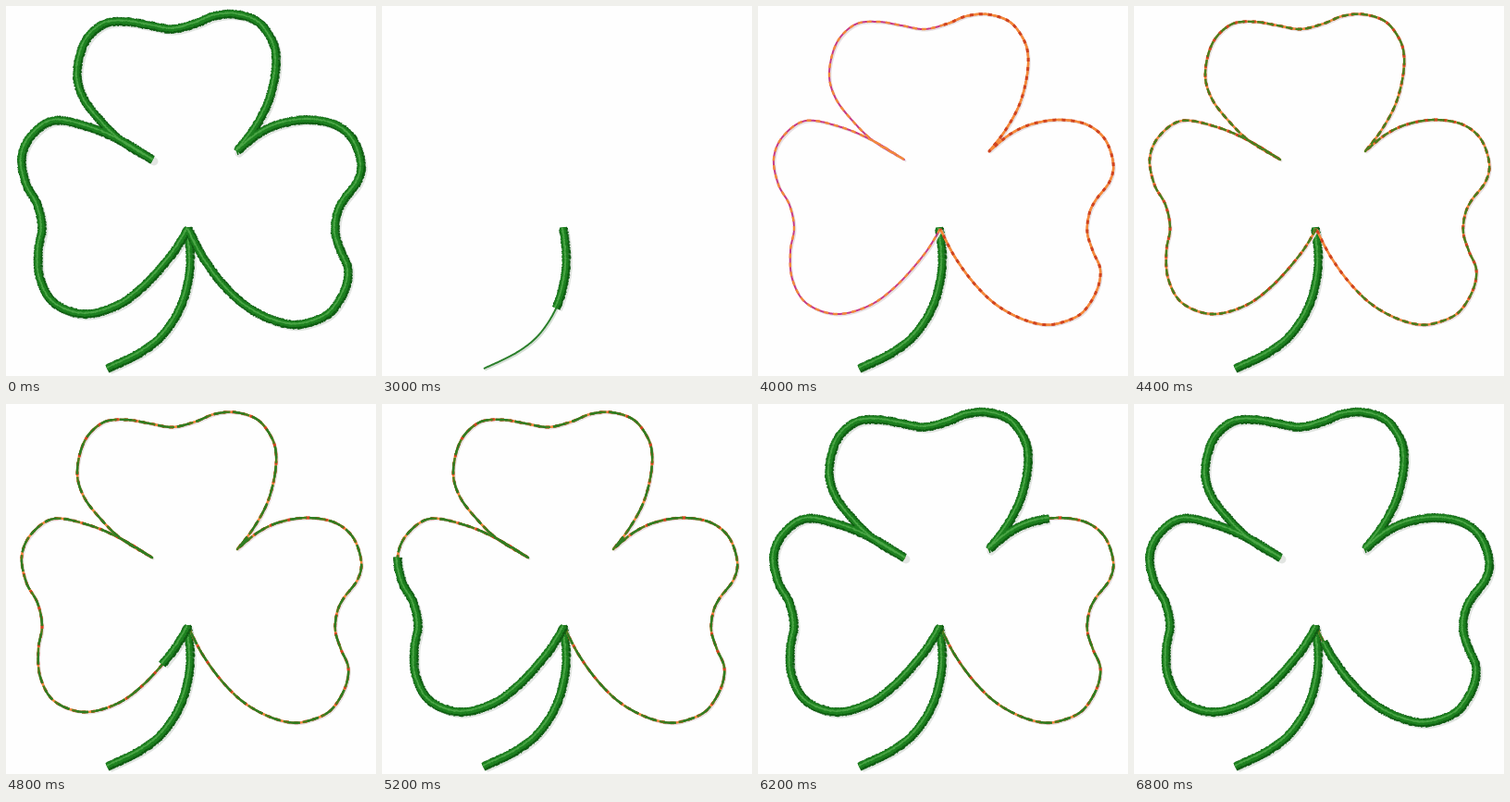
An HTML page with a canvas for the animation above (7000 ms loop, 400 by 400 pixels).

```html
<!DOCTYPE html>
<html lang="en">
<head>
<meta charset="utf-8">
<title>Shamrock embroidery</title>
<style>
  html, body { margin: 0; width: 100%; height: 100%; overflow: hidden; background: #fefefe; }
  canvas { display: block; }
</style>
</head>
<body>
<canvas id="stage" width="400" height="400"></canvas>
<script>
const ctx = document.getElementById('stage').getContext('2d');
const LOOP = 7000, STEP = 200;

// Smooth curve through the knots, resampled to one point per pixel of length.
function curve(text) {
  const knots = text.split(' ').map(p => p.split(',').map(Number));
  const at = i => knots[Math.max(0, Math.min(knots.length - 1, i))];
  const out = [knots[0]];
  let last = knots[0];
  for (let i = 0; i < knots.length - 1; i++) {
    const [a, b, c, d] = [at(i - 1), at(i), at(i + 1), at(i + 2)];
    for (let s = 1; s <= 200; s++) {
      const t = s / 200;
      const p = [0, 1].map(k => b[k] + 0.5 * t * (c[k] - a[k]
        + t * (2 * a[k] - 5 * b[k] + 4 * c[k] - d[k]
        + t * (3 * (b[k] - c[k]) + d[k] - a[k]))));
      if (Math.hypot(p[0] - last[0], p[1] - last[1]) >= 1) out.push(last = p);
    }
  }
  return out;
}

const stem = curve('196,240 199,265 198,292 189,325 170,355 145,375 110,392');
const leftLeaf = curve('197,241 180,268 150,302 120,324 84,333 52,321 37,295 35,265 39,240 34,215 22,193 17,165 27,141 52,124 90,131 125,146 158,166');
const topLeaf = curve('158,166 125,146 103,125 84,100 77,73 85,40 105,20 130,17 155,21 180,25 205,19 225,11 248,9 272,17 287,36 292,55 290,80 282,108 267,135 250,157');
const rightLeaf = curve('250,157 272,139 295,128 325,123 355,128 375,144 384,170 380,190 365,210 358,225 356,245 362,265 370,285 366,308 350,332 325,343 305,344 280,336 255,321 232,298 212,270 197,241');
const outline = [...leftLeaf, ...topLeaf, ...rightLeaf];
const total = outline.length;

const nearest = (pts, x, y) => pts.reduce((best, p, i) =>
  Math.hypot(p[0] - x, p[1] - y) < Math.hypot(pts[best][0] - x, pts[best][1] - y) ? i : best, 0);
const leftSide = nearest(outline, 17, 165);
const topMiddle = nearest(outline, 201, 21);

const noise = n => {
  const v = Math.sin(n * 127.1) * 43758.5453;
  return v - Math.floor(v);
};

// Linear interpolation through [time, value] keys, held at both ends.
function track(time, keys) {
  if (time <= keys[0][0]) return keys[0][1];
  for (let i = 1; i < keys.length; i++) {
    const [t0, v0] = keys[i - 1], [t1, v1] = keys[i];
    if (time <= t1) return v0 + (v1 - v0) * (time - t0) / (t1 - t0);
  }
  return keys[keys.length - 1][1];
}

function thread(pts, from, to, color, width, dash = [], shift = 0) {
  const part = pts.slice(Math.round(from), Math.round(to));
  if (part.length < 2) return;
  ctx.beginPath();
  part.forEach(([x, y]) => ctx.lineTo(x + shift, y + shift));
  ctx.setLineDash(dash);
  ctx.strokeStyle = color;
  ctx.lineWidth = width;
  ctx.lineJoin = 'round';
  ctx.stroke();
  ctx.setLineDash([]);
}

const layers = [
  { color: '#0f5c12', half: 4.4, rough: 1.1, lift: 0 },
  { color: '#1d801f', half: 3, rough: 1.2, lift: 0.8 },
  { color: '#4aa545', half: 0.7, rough: 0.9, lift: 1.2 }
];

// Dense cross stitches, lit from the upper left.
function satin(pts, to) {
  const end = Math.min(Math.round(to), pts.length);
  if (end < 2) return;
  layers.forEach(({ color, half, rough, lift }, layer) => {
    ctx.beginPath();
    for (let i = 0; i < end; i++) {
      const [x, y] = pts[i];
      const a = pts[Math.max(0, i - 2)], b = pts[Math.min(pts.length - 1, i + 2)];
      const len = Math.hypot(b[0] - a[0], b[1] - a[1]) || 1;
      const nx = (a[1] - b[1]) / len, ny = (b[0] - a[0]) / len;
      const offset = -(nx + ny) * lift;
      const h1 = offset + half + rough * (noise(i + layer * 31) - 0.3);
      const h2 = offset - half - rough * (noise(i + layer * 57 + 900) - 0.3);
      ctx.moveTo(x + nx * h1, y + ny * h1);
      ctx.lineTo(x + nx * h2, y + ny * h2);
    }
    ctx.strokeStyle = color;
    ctx.lineWidth = 1.4;
    ctx.stroke();
  });
}

function draw(time) {
  const finished = time < 3000;
  const grow = (start, end) => track(time, [[start, 0], [end, total]]);
  const stemEnd = finished || time >= 3200 ? stem.length : nearest(stem, 188, 327);
  const satinEnd = finished ? total : track(time,
    [[4736, 0], [5200, leftSide], [5800, topMiddle], [6800, total - 17]]);

  ctx.fillStyle = '#fefefe';
  ctx.fillRect(0, 0, 400, 400);

  thread(stem, 0, stemEnd, '#e2e5e2', 9, [], 2);
  thread(outline, 0, satinEnd, '#e2e5e2', 9, [], 2);

  if (!finished) {
    thread(stem, 0, stem.length, '#d5ded5', 2, [], 1.5);
    thread(stem, 0, stem.length, '#2b7f2b', 2);
  }
  satin(stem, stemEnd);

  if (!finished) {
    const first = track(time, [[3150, 0], [3200, 230], [3470, total]]);
    const second = grow(3470, 3780);
    const back = total - track(time, [[3780, 0], [4000, total - topMiddle], [4100, total]]);
    const under = track(time, [[4100, 0], [4400, total - 75], [4420, total]]);
    const again = grow(4420, 4736);
    thread(outline, 0, first, '#e6e0e2', 2, [], 1.5);
    thread(outline, 0, first, '#c83a86', 2);
    thread(outline, 0, second, '#f28a3c', 2.4, [5, 5]);
    thread(outline, back, total, '#f58a3a', 2.4);
    thread(outline, back, total, '#cf4420', 3, [4, 6]);
    thread(outline, 0, under, '#47801f', 2.4, [7.5, 3]);
    thread(outline, 0, again, '#2f7d22', 2.4, [13, 8]);
  }
  satin(outline, satinEnd);
}

let shown = -1;
function tick() {
  const time = Math.floor(performance.now() % LOOP / STEP) * STEP;
  if (time !== shown) draw(shown = time);
  requestAnimationFrame(tick);
}
tick();
</script>
</body>
</html>
```
